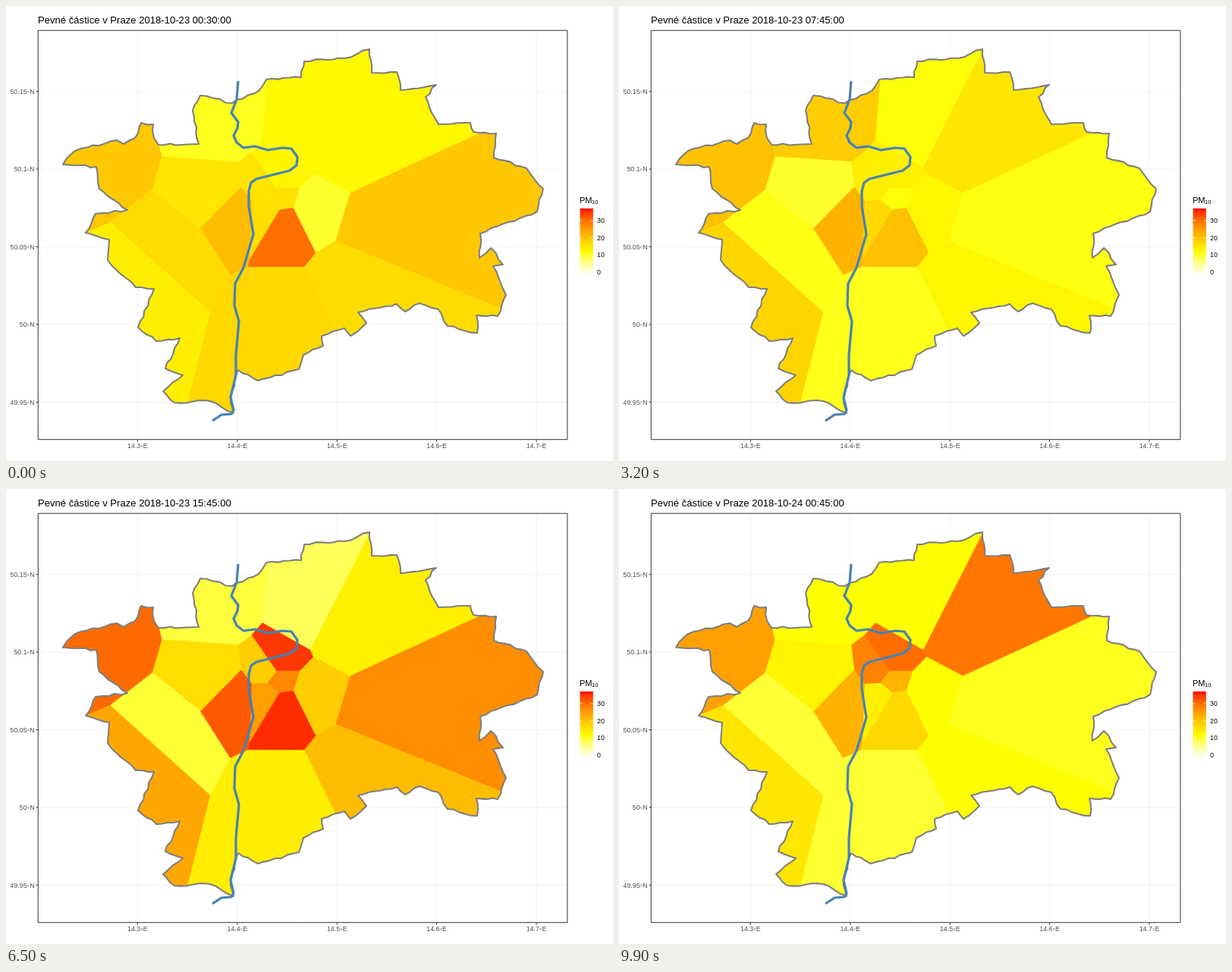
An HTML page with a canvas that plays this animation: 800x600 px, repeating every 10000 ms.

```html
<!DOCTYPE html>
<html lang="cs">
<head>
<meta charset="utf-8">
<title>Pevné částice</title>
<style>
html, body { margin: 0; width: 100%; height: 100%; overflow: hidden; background: #fff; }
canvas { display: block; width: 800px; height: 600px; }
</style>
</head>
<body>
<canvas id="map" width="800" height="600"></canvas>
<script>
const ctx = document.getElementById('map').getContext('2d');
const FONT = '"Liberation Sans", Arial, sans-serif';
const FRAME = 100, FRAMES = 100, HOURS = 24;

const points = text => text.trim().split(/\s+/).map(p => p.split(',').map(Number));
const mix = (a, b, k) => a + (b - a) * k;

function makePath(pts, closed) {
  const path = new Path2D();
  pts.forEach(([x, y]) => path.lineTo(x, y));
  if (closed) path.closePath();
  return path;
}

function seeded(seed) {
  return () => (seed = seed * 16807 % 2147483647) / 2147483647;
}

// Break every side into short pieces and nudge the joints sideways
function roughen(pts, piece, amount) {
  const rnd = seeded(77);
  return pts.flatMap(([x, y], i) => {
    const [u, v] = pts[(i + 1) % pts.length];
    const len = Math.hypot(u - x, v - y);
    const n = Math.max(1, Math.round(len / piece));
    return Array.from({ length: n }, (_, j) => {
      const off = j ? (rnd() - 0.5) * amount : 0;
      return [mix(x, u, j / n) - (v - y) / len * off, mix(y, v, j / n) + (u - x) / len * off];
    });
  });
}

// Main corners of the city border, clockwise from the western tip
const corners = points(`75,209 91,191 146,177 155,182 170,174 178,154 194,156 195,174 201,183
  254,182 246,138 256,118 298,128 333,112 343,97 389,94 393,73 446,69 479,57 482,88 515,87
  520,111 567,104 553,120 570,156 612,154 616,166 646,168 643,200 686,214 708,241 700,271
  625,300 624,332 639,319 655,341 642,343 659,381 648,409 620,408 621,431 582,422 570,400
  545,392 526,403 515,393 464,404 475,418 454,435 446,425 416,435 418,448 392,460 386,479
  332,494 306,480 296,515 300,537 269,521 222,523 207,508 233,487 210,478 229,438 198,442
  174,424 195,373 171,371 134,335 136,308 105,299 118,274 160,269 123,241 119,212`);
const border = makePath(roughen(corners, 8, 3), true);

const river = makePath(points(`306,99 304,123 297,141 306,153 305,161 300,171 304,180 313,187
  328,185 345,190 364,187 376,188 384,199 383,210 374,217 330,228 323,233 320,244 320,264
  326,301 313,345 302,366 301,395 307,416 303,460 303,487 296,516 300,533 297,538 284,539
  272,547`));

// Measuring stations; each colours the area nearest to it
const stations = points(`118.5,199.4 284.6,160.8 278.8,246.8 216,325 185,359.5 302.4,270
  345.1,271.6 343.2,239.3 361,227 361,253 365.5,283.9 393.6,169.6 440.1,193.2 485.6,291.5
  401.5,266 458,359.3 365.1,404.9`);

// Keep the part of a polygon closer to p than to q
function nearer(poly, p, q) {
  const side = ([x, y]) =>
    (x - (p[0] + q[0]) / 2) * (q[0] - p[0]) + (y - (p[1] + q[1]) / 2) * (q[1] - p[1]);
  return poly.flatMap((a, i) => {
    const b = poly[(i + 1) % poly.length];
    const sa = side(a), sb = side(b);
    const kept = sa <= 0 ? [a] : [];
    if (sa * sb < 0) {
      const k = sa / (sa - sb);
      kept.push([mix(a[0], b[0], k), mix(a[1], b[1], k)]);
    }
    return kept;
  });
}

const panel = points('42,32 740,32 740,572 42,572');
const cells = stations.map(p => makePath(
  stations.reduce((poly, q) => q === p ? poly : nearer(poly, p, q), panel), true));

// Station levels at a few moments: 0 red, 255 yellow, 510 white
const moments = [
  [0, '200 285 230 220 238 188 222 228 246 225 110 248 248 200 300 220 216'],
  [23, '198 172 282 255 234 325 248 262 272 240 218 246 360 360 278 208 230'],
  [43, '188 246 320 298 188 0 178 208 200 290 160 285 72 162 210 295 345'],
  [56, '128 315 198 315 146 72 115 225 98 122 44 450 308 46 194 188 295'],
  [75, '82 318 248 300 188 108 205 182 8 150 44 228 164 246 218 188 174'],
  [87, '178 255 208 138 198 216 216 222 158 234 180 228 280 162 236 186 255'],
  [99, '160 255 245 308 230 178 240 130 108 180 216 255 118 285 255 257 305']
].map(([at, text]) => ({ at, levels: text.split(' ').map(Number) }));

function levelsAt(frame) {
  const next = Math.max(1, moments.findIndex(m => m.at >= frame));
  const a = moments[next - 1], b = moments[next];
  const k = (frame - a.at) / (b.at - a.at);
  return a.levels.map((level, i) => mix(level, b.levels[i], k));
}

function shade(level) {
  const g = Math.round(Math.min(255, level));
  const b = Math.round(Math.max(0, level - 255));
  return `rgb(255,${g},${b})`;
}

function stamp(frame) {
  const hour = Math.floor(frame * HOURS / (FRAMES - 1));
  const day = 23 + Math.floor(hour / 24);
  const hh = String(hour % 24).padStart(2, '0');
  return `2018-10-${day} ${hh}:${hour ? 45 : 30}:00`;
}

function label(text, x, y, size, color) {
  ctx.font = `${size}px ${FONT}`;
  ctx.fillStyle = color;
  ctx.fillText(text, x, y);
}

function line(x1, y1, x2, y2, color, width) {
  ctx.strokeStyle = color;
  ctx.lineWidth = width;
  ctx.beginPath();
  ctx.moveTo(x1, y1);
  ctx.lineTo(x2, y2);
  ctx.stroke();
}

const five = [0, 1, 2, 3, 4];
const lats = five.map(i => [String(+(50.15 - i * 0.05).toFixed(2)), 112.7 + i * 102.4]);
const lons = five.map(i => [(14.3 + i * 0.1).toFixed(1), 173.4 + i * 131.4]);

function drawGrid() {
  lats.forEach(([, y]) => line(42, y, 740, y, '#f3f3f3', 1));
  lons.forEach(([, x]) => line(x, 32, x, 572, '#f3f3f3', 1));
}

// Number, small ring for degrees, hemisphere letter
function axisLabel(num, side, x, y, anchor) {
  ctx.font = `8.8px ${FONT}`;
  const w = ctx.measureText(num).width, ring = 3.6;
  const left = x - (w + ring + ctx.measureText(side).width) * anchor;
  label(num, left, y, 8.8, '#4d4d4d');
  label(side, left + w + ring, y, 8.8, '#4d4d4d');
  ctx.strokeStyle = '#777';
  ctx.lineWidth = 0.6;
  ctx.beginPath();
  ctx.arc(left + w + 1.8, y - 2.6, 1.1, 0, Math.PI * 2);
  ctx.stroke();
}

function drawAxes() {
  ctx.strokeStyle = '#333';
  ctx.lineWidth = 1;
  ctx.strokeRect(42.3, 32.2, 697.6, 539.5);
  lats.forEach(([t, y]) => {
    line(39.5, y, 42.3, y, '#333', 1);
    axisLabel(t, 'N', 37.5, y + 3.2, 1);
  });
  lons.forEach(([t, x]) => {
    line(x, 572, x, 574.7, '#333', 1);
    axisLabel(t, 'E', x, 583, 0.5);
  });
}

// Red to yellow over the upper two thirds, then on to white
const ramp = ctx.createLinearGradient(0, 267, 0, 355);
for (let i = 0; i <= 24; i++) {
  const k = i / 16;
  const level = k <= 1 ? 255 * k ** 0.65 : 255 + 255 * (2 * k - 2) ** 0.75;
  ramp.addColorStop(i / 24, shade(level));
}

function drawLegend() {
  label('PM', 756, 260, 11, '#000');
  label('10', 772, 261, 7.5, '#000');
  ctx.fillStyle = ramp;
  ctx.fillRect(756.5, 267, 17.3, 88);
  for (let i = 0; i < 4; i++) {
    const y = 351 - i * 22.7;
    line(756.5, y, 760, y, '#fff', 0.6);
    line(770.3, y, 773.8, y, '#fff', 0.6);
    label(String(i * 10), 779, y + 3.1, 8.8, '#000');
  }
}

function drawCells(frame) {
  const levels = levelsAt(frame);
  ctx.save();
  ctx.clip(border);
  ctx.lineWidth = 0.6;
  cells.forEach((cell, i) => {
    ctx.fillStyle = ctx.strokeStyle = shade(levels[i]);
    ctx.fill(cell);
    ctx.stroke(cell);
  });
  ctx.restore();
}

function draw(frame) {
  ctx.fillStyle = '#fff';
  ctx.fillRect(0, 0, 800, 600);
  ctx.lineJoin = 'round';
  drawGrid();
  drawCells(frame);
  ctx.strokeStyle = '#7f7f7f';
  ctx.lineWidth = 2.1;
  ctx.stroke(border);
  ctx.strokeStyle = '#4682b4';
  ctx.lineWidth = 3.2;
  ctx.stroke(river);
  drawAxes();
  drawLegend();
  label('Pevné částice v Praze ' + stamp(frame), 42, 23, 13.1, '#000');
}

const start = performance.now();
function tick() {
  const t = Math.max(0, performance.now() - start);
  draw(Math.floor(t / FRAME) % FRAMES);
  requestAnimationFrame(tick);
}
tick();
</script>
</body>
</html>
```
